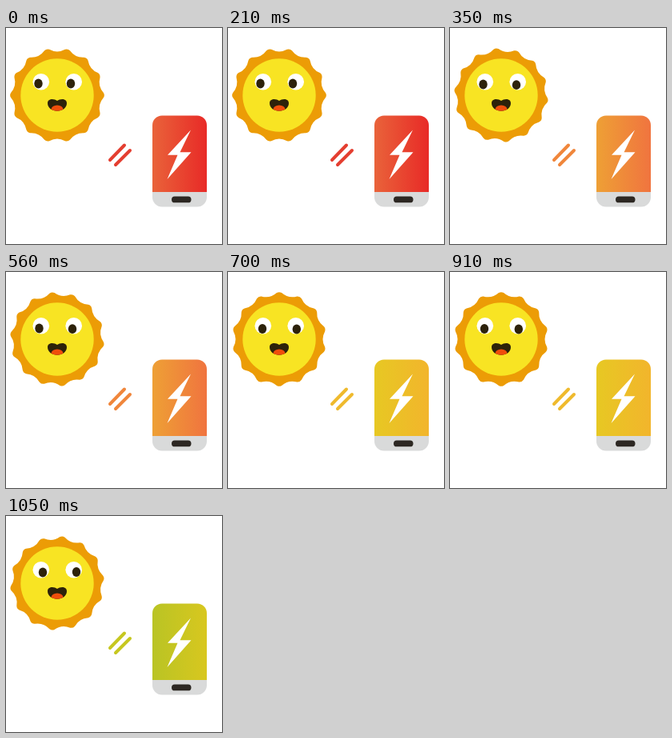
Recreate the animation shown at these times as an HTML page. Size 270x270 px, loop 1400 ms.

```html
<!DOCTYPE html>
<html lang="en">
<head>
<meta charset="utf-8">
<title>Solar charging</title>
<style>
  html, body { margin: 0; width: 100%; height: 100%; overflow: hidden; background: #fff; }
  svg { display: block; width: 100%; height: 100%; }
</style>
</head>
<body>
<svg viewBox="0 0 270 270">
  <defs>
    <linearGradient id="charge">
      <stop id="chargeStart" offset="0"/>
      <stop id="chargeEnd" offset="1"/>
    </linearGradient>
    <clipPath id="phoneShape"><rect x="183" y="109.5" width="68" height="114" rx="12"/></clipPath>
    <clipPath id="mouthShape"><path id="mouth" d="M52 94C52 88 60 88 64 91C68 88 76 88 76 94C76 100 70 103.800 64 103.800C58 103.800 52 100 52 94Z"/></clipPath>
  </defs>

  <path id="corona" fill="#ec9c06"/>
  <circle cx="64" cy="84" r="45.700" fill="#f8e423"/>
  <g fill="#fff"><circle cx="43.800" cy="67.300" r="10.300"/><circle cx="84.700" cy="67.200" r="10.300"/></g>
  <g fill="#2d220a">
    <ellipse id="leftPupil" rx="5.200" ry="5.900"/>
    <ellipse id="rightPupil" rx="5.200" ry="5.900"/>
    <use href="#mouth"/>
  </g>
  <ellipse cx="64" cy="101.800" rx="7.500" ry="5.300" fill="#f04e0b" clip-path="url(#mouthShape)"/>

  <path id="rays" d="M130 165L148 146.500M137 171L155 153" fill="none" stroke-width="4" stroke-linecap="round"/>

  <g clip-path="url(#phoneShape)">
    <rect x="183" y="109" width="68" height="97" fill="url(#charge)"/>
    <rect x="183" y="205" width="68" height="19" fill="#d9dada"/>
  </g>
  <rect x="207" y="210.500" width="24.500" height="7.800" rx="3.900" fill="#2d2823"/>
  <path d="M231 127.500L202 158.700H214.500L201.500 189L231.500 155.200H217.500Z" fill="#fff"/>
</svg>
<script>
  const STEP = 350;
  const POINTS = 14;
  const steps = [
    { left: [40.5, 69.5], right: [81, 69.5], start: '#e9633a', end: '#e82a27', rays: '#e43e30' },
    { left: [41.5, 70.5], right: [83, 71.2], start: '#eea035', end: '#f0743f', rays: '#f0863b' },
    { left: [43, 71], right: [85.8, 71.5], start: '#e7c823', end: '#f2b52c', rays: '#efba2d' },
    { left: [46, 70.5], right: [88, 70], start: '#b9c424', end: '#d8c71f', rays: '#c6c720' }
  ];
  const $ = id => document.getElementById(id);

  const polar = (radius, turn) => {
    const angle = turn * 2 * Math.PI / POINTS;
    return `${(radius * Math.cos(angle)).toFixed(2)} ${(radius * Math.sin(angle)).toFixed(2)}`;
  };

  // Rounded tips joined by shallow concave valleys.
  let outline = `M${polar(58, -0.12)}`;
  for (let i = 0; i < POINTS; i++) {
    outline += `Q${polar(59.8, i)} ${polar(58, i + 0.12)}Q${polar(51.8, i + 0.5)} ${polar(58, i + 0.88)}`;
  }
  $('corona').setAttribute('d', outline + 'Z');

  function place(id, [x, y]) {
    $(id).setAttribute('cx', x);
    $(id).setAttribute('cy', y);
  }

  function draw(time) {
    const index = Math.floor(time / STEP) % steps.length;
    const step = steps[index];
    const turn = index * 360 / POINTS / steps.length;
    $('corona').setAttribute('transform', `translate(64 84) rotate(${turn})`);
    place('leftPupil', step.left);
    place('rightPupil', step.right);
    $('chargeStart').setAttribute('stop-color', step.start);
    $('chargeEnd').setAttribute('stop-color', step.end);
    $('rays').setAttribute('stroke', step.rays);
  }

  const began = performance.now();
  function tick() {
    draw(performance.now() - began);
    requestAnimationFrame(tick);
  }
  tick();
</script>
</body>
</html>
```
